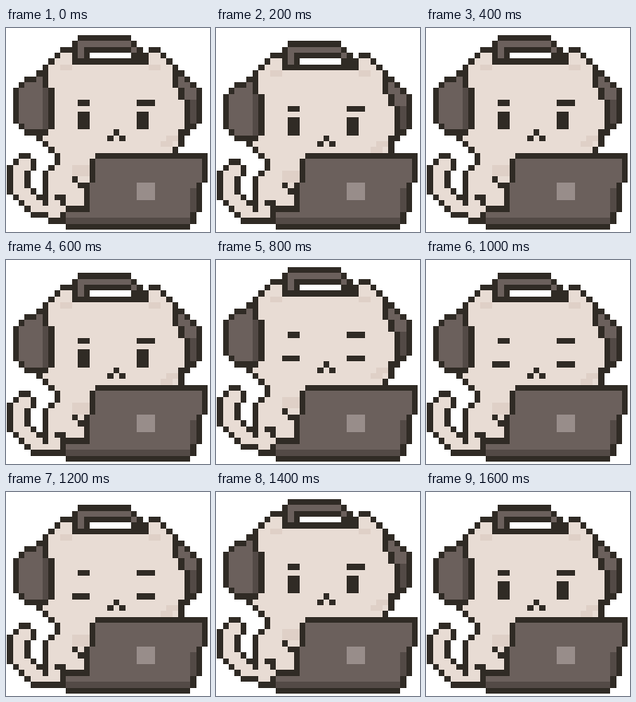
An HTML page that plays this animation: 256 by 256 pixels, repeating every 1800 ms.

```html
<!DOCTYPE html>
<html lang="en">
<head>
<meta charset="utf-8">
<title>Cat at a laptop</title>
<style>
html, body { margin: 0; width: 100%; height: 100%; overflow: hidden; background: #fff; }
svg { display: block; width: 100vw; height: 100vh; }
</style>
</head>
<body>
<svg id="stage" viewBox="0 0 256 256" shape-rendering="crispEdges"></svg>
<script>
const DARK = '#302b25', GRAY = '#6b605c', SHADE = '#534a46';
const CREAM = '#e8dcd4', BLUSH = '#dfd0c7', MARK = '#988d8a';
const STEP = 200, LOOP = 1800;
const LOW = '010101101', SHUT = '000011100';
const stage = document.getElementById('stage');

// Outlines as corner points on a coarse grid
const LEFT_CUP = '6,7 2,9 2,15 4,16 8,16 8,7';
const RIGHT_CUP = '28,7 29.8,7 32,9 32,15 30,16 28,16';
const BAND = '13,1 21,1 21,2 13,2 13,4 12,4 12,2';
const CAT = '9.2,3 11,3 11,5 24,5 24,3 25.8,3 28,5 28,9 29,9 29,11 30,11 30,16 ' +
  '29,16 29,19 28,19 28,21 15,21 15,31 7,31 7,23 9,22 9,21 6.2,18 6,17 8,16 8,9 7,9 7,5';
const TAIL = '2.4,21 4,21 4,23 3,23 3.2,26 7,29.8 7,30 4.5,30 1,26.6 1,22';
const LID = '15.3,21 33.3,21 31.1,32 10,32 10,30 13.5,30';

const px = c => Math.round(1.15 + 7.42 * c);
const py = r => Math.round(8.8 + 7.4 * r);

const cell = ([x, y, w = 1, h = 1]) =>
  `M${px(x)} ${py(y)}H${px(x + w)}V${py(y + h)}H${px(x)}Z`;
const fill = (color, ...cells) =>
  `<path fill="${color}" d="${cells.map(cell).join('')}"/>`;

// Turns an outline into one-row runs of grid cells, lowered by d
function runs(outline, d) {
  const pts = outline.split(' ').map(p => {
    const [x, y] = p.split(',').map(Number);
    return [x, d ? Math.min(y + d, 31) : y];
  });
  const out = [];
  for (let row = 0; row < 33; row++) {
    const y = row + 0.5, hits = [];
    pts.forEach(([x0, y0], i) => {
      const [x1, y1] = pts[(i + 1) % pts.length];
      if ((y0 < y) !== (y1 < y)) hits.push(x0 + (x1 - x0) * (y - y0) / (y1 - y0));
    });
    const cols = hits.sort((a, b) => a - b).map(x => Math.ceil(x - 0.5));
    for (let i = 0; i < cols.length; i += 2) {
      out.push([cols[i], row, cols[i + 1] - cols[i], 1]);
    }
  }
  return out;
}

// Fills the outlines and puts a one-cell border around them
function shape(color, d, ...outlines) {
  const inner = outlines.flatMap(o => runs(o, d));
  const edge = inner.flatMap(([x, y, w, h]) =>
    [[x - 1, y, w + 2, h], [x, y - 1, w, h + 2]]);
  return fill(DARK, ...edge) + fill(color, ...inner);
}

function face(d, shut) {
  const eyes = shut
    ? [[11, 15 + d, 3], [22, 15 + d, 3]]
    : [[12, 13 + d, 2, 3], [22, 13 + d, 2, 3]];
  const brows = [[12, 11 + d, 2], [22, 11 + d, 3]];
  const mouth = [[18, 16 + d], [17, 17 + d], [19, 17 + d]];
  return fill(DARK, ...eyes, ...brows, ...mouth);
}

function draw(d, shut) {
  return shape(GRAY, d, LEFT_CUP, RIGHT_CUP) +
    fill(SHADE, [6, 9 + d, 1, 7], [31, 11 + d, 1, 4]) +
    shape(CREAM, d, CAT, TAIL) +
    fill(BLUSH, [9, 5 + d, 2], [24, 5 + d, 2], [27, 17 + d, 2], [26, 18 + d, 2],
      [11, 22 + d, 3, 2]) +
    shape(GRAY, d, BAND) +
    fill(GRAY, [21, 2 + d]) +
    fill(DARK, [21, 3 + d, 2], [22, 2 + d], [11, 4 + d, 12]) +
    face(d, shut) +
    fill(DARK, [11, 24 + d], [12, 25 + d], [8, 27 + d, 2], [9, 28 + d]) +
    shape(GRAY, 0, LID) +
    fill(DARK, [33, 20]) +
    fill(SHADE, [10, 31, 21], [31, 26, 1, 4]) +
    fill(MARK, [22, 25, 3, 3]);
}

let last = -1;
function render(t) {
  const step = Math.floor((t % LOOP) / STEP);
  if (step === last) return;
  last = step;
  stage.innerHTML = draw(+LOW[step], SHUT[step] === '1');
}

const start = performance.now();
function tick() {
  render(performance.now() - start);
  requestAnimationFrame(tick);
}
tick();
</script>
</body>
</html>
```
